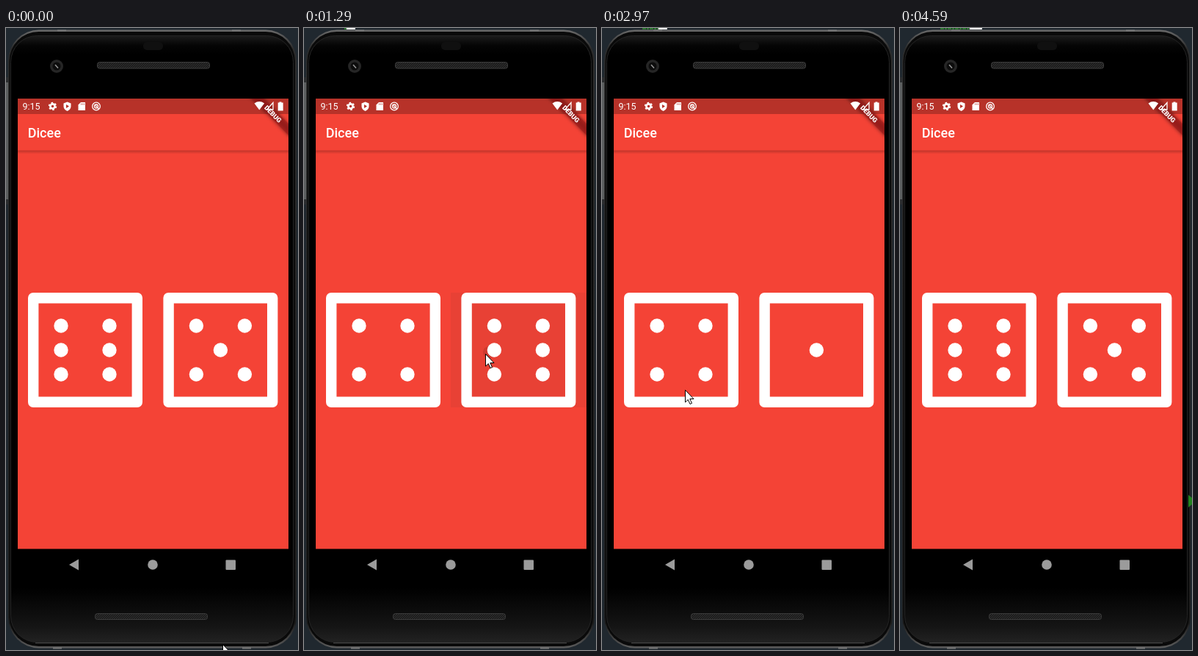
An HTML page that plays this animation: 398 by 846 pixels, repeating every 4.67 s.

```html
<!DOCTYPE html>
<html lang="en">
<head>
<meta charset="utf-8">
<title>Dicee</title>
<style>
  html, body { margin: 0; width: 100%; height: 100%; overflow: hidden; background: #20282f; }
  svg { display: block; width: 398px; height: 846px; }
  text { font-family: Roboto, sans-serif; fill: #fff; }
</style>
</head>
<body>
<svg viewBox="0 0 398 846">
  <defs>
    <linearGradient id="body" x1="0" y1="0" x2="0" y2="1">
      <stop offset="0" stop-color="#1c1c1c"/>
      <stop offset=".016" stop-color="#050505"/>
      <stop offset=".03" stop-color="#000"/>
      <stop offset=".91" stop-color="#000"/>
      <stop offset=".975" stop-color="#151515"/>
      <stop offset="1" stop-color="#222"/>
    </linearGradient>
    <linearGradient id="rim" x1="0" y1="0" x2="0" y2="1">
      <stop offset="0" stop-color="#6a6a6a"/>
      <stop offset=".03" stop-color="#2c2c2c"/>
      <stop offset=".96" stop-color="#1c1c1c"/>
      <stop offset="1" stop-color="#5c5c5c"/>
    </linearGradient>
    <linearGradient id="gleam">
      <stop offset="0" stop-color="#333"/>
      <stop offset=".75" stop-color="#aaa"/>
      <stop offset="1" stop-color="#555"/>
    </linearGradient>
    <linearGradient id="shade" x1="0" y1="0" x2="0" y2="1">
      <stop offset="0" stop-color="#000" stop-opacity=".22"/>
      <stop offset="1" stop-color="#000" stop-opacity="0"/>
    </linearGradient>
    <pattern id="mesh" width="3" height="3" patternUnits="userSpaceOnUse">
      <rect width="3" height="3" fill="#1b1b1b"/>
      <path d="M0 3L3 0" stroke="#383838" stroke-width=".8"/>
    </pattern>
    <filter id="soft" x="-20%" y="-100%" width="140%" height="300%"><feGaussianBlur stdDeviation="2.7"/></filter>
    <clipPath id="view"><rect x="16" y="96" width="369" height="612.6"/></clipPath>
  </defs>

  <!-- phone -->
  <rect width="398" height="846" fill="#20282f"/>
  <rect y="67" width="5" height="173" fill="#5c5f60"/>
  <path d="M0 70.5h5M0 236.5h5" stroke="#2b2d2f" stroke-width="7"/>
  <rect x="3" y="2.5" width="393" height="841" rx="42" fill="url(#rim)"/>
  <rect x="4.500" y="5" width="389.500" height="836" rx="40" fill="#0a0a0a"/>
  <rect x="6.5" y="10.5" width="385" height="825" rx="36" fill="url(#body)" stroke="#242424"/>
  <path d="M40 10.500H358" stroke="url(#gleam)"/>
  <path d="M40 836.500H358" stroke="#484848"/>
  <path d="M64 843.5h12M322 843.5h12M70 3.5h12M308 3.5h12" stroke="#777" stroke-width="2"/>
  <rect x="187" y="19" width="27" height="11" rx="5" fill="#101010"/>
  <circle cx="69" cy="52" r="9" fill="#262626"/>
  <circle cx="69" cy="52" r="5.5" fill="#0c0c0c"/>
  <path d="M67 50l4 4.500" stroke="#999" stroke-width="1.500"/>
  <g fill="url(#mesh)" stroke="#3c3c3c">
    <rect x="124.5" y="46.5" width="153" height="8.500" rx="3"/>
    <rect x="121.5" y="796.5" width="153" height="8" rx="3"/>
  </g>
  <g fill="#9b9b9b">
    <path d="M86 730l13-7.5v15z"/>
    <circle cx="200" cy="730" r="6.800"/>
    <rect x="299.5" y="723.5" width="13.5" height="13.5" rx="1"/>
  </g>

  <!-- app -->
  <g clip-path="url(#view)">
    <rect x="16" y="96" width="369" height="613" fill="#f44336"/>
    <rect x="16" y="166.500" width="369" height="5" fill="url(#shade)"/>
    <rect x="16" y="96" width="369" height="21" fill="#b73229"/>
    <text x="29.700" y="149" font-size="18" font-weight="500">Dicee</text>
    <g transform="translate(364 117) rotate(45)">
      <rect x="-60" y="-5.400" width="120" height="10.800" fill="#000" opacity=".5" filter="url(#soft)"/>
      <rect x="-60" y="-5.4" width="120" height="10.8" fill="#a51a1a" opacity=".63"/>
      <text y="3.2" font-size="9" font-weight="900" text-anchor="middle">DEBUG</text>
    </g>
    <text x="22.5" y="111" font-size="12.5">9:15</text>
    <g fill="#fff">
      <circle cx="63.5" cy="106.5" r="3.1" fill="none" stroke="#fff" stroke-width="2.6"/>
      <circle cx="63.5" cy="106.5" r="4.8" fill="none" stroke="#fff" stroke-width="1.8" stroke-dasharray="2.5 2.526"/>
      <path d="M83.500 100.500l5 2v4q0 4-5 6.500q-5-2.500-5-6.500v-4z"/>
      <path d="M82 104v5l4-2.500z" fill="#b73229"/>
      <path d="M102 101h6v11h-9.500v-7.500z"/>
      <path d="M102.500 102.500v2M104.500 102.500v2M106.500 102.500v2" stroke="#b73229" stroke-width=".8"/>
      <g fill="none" stroke="#fff" stroke-width="1.3">
        <circle cx="123" cy="106.500" r="5.300"/>
        <circle cx="123" cy="106.500" r="2.500"/>
        <path d="M122 105.500l4.500 4.500"/>
      </g>
      <path d="M338.500 102.500q6.800-4.800 13.600 0l-6.800 9z"/>
      <path d="M364 101.500v9.500h-8.500z" fill="none" stroke="#fff" stroke-width="1.300"/>
      <path d="M372.500 100.500h3v1h2.200v11h-7v-11h1.800z"/>
    </g>
    <g id="ink">
      <rect y="360" width="185" height="156" fill="#e84135"/>
      <circle id="spot" r="8" fill="#cf392f"/>
    </g>
    <g id="dice"></g>
  </g>

  <!-- windows behind the phone -->
  <g id="strip">
    <path id="done" stroke="#2f7a33" stroke-width="2" stroke-dasharray="5 1 3 1"/>
    <path id="head" stroke="#fff" stroke-width="2"/>
  </g>
  <path id="run" d="M393 635l5 4v9l-5 4z" fill="#23831f"/>

  <circle id="tap" r="12" fill="#f9a01e"/>
  <path id="mouse" d="M.5 .5V17L4.300 13.500L7 19.500L9.500 18.400L6.800 12.500H12Z" fill="#fff" stroke="#000" stroke-linejoin="round"/>
</svg>
<script>
  const LOOP = 4670, TICK = 76.6, LEAD = 26;
  const $ = id => document.getElementById(id);
  const show = (el, on) => el.setAttribute('visibility', on ? 'visible' : 'hidden');
  const move = (el, [x, y]) => el.setAttribute('transform', `translate(${Math.round(x)} ${Math.round(y)})`);

  // pointer route: tick, x, y
  const route = [
    [0, 295, 838], [4, 196, 630], [7, 82, 455], [8, 66, 454], [10, 72, 456],
    [13, 225, 466], [15, 318, 453], [16, 252, 441], [17, 247, 443], [20, 225, 452],
    [23, 135, 462], [24, 123, 457], [26, 150, 485], [29, 323, 485], [31, 364, 470],
    [33, 312, 467], [36, 210, 566], [40, 110, 470], [44, 317, 470], [46, 295, 487],
    [48, 172, 545], [50, 95, 480], [54, 300, 475], [57, 385, 870]
  ];
  // presses: tick, die, face rolled
  const taps = [[8, 0, 4], [16, 1, 6], [24, 0, 4], [31, 1, 1], [40, 0, 6], [44, 1, 2], [50, 0, 6], [54, 1, 5]];

  // pips by column and row, with the faces that show each
  const pips = [
    [-1, -1, '456'], [1, -1, '23456'], [-1, 0, '6'], [0, 0, '135'],
    [1, 0, '6'], [-1, 1, '23456'], [1, 1, '456']
  ];

  function makeDie(x) {
    const dots = pips.map(([c, r]) => `<circle cx="${c * 33}" cy="${r * 33}" r="9.700"/>`).join('');
    $('dice').insertAdjacentHTML('beforeend',
      `<g transform="translate(${x} 438)" fill="#fff"><path fill-rule="evenodd"
      d="M-71-78H71a7 7 0 0 1 7 7V71a7 7 0 0 1-7 7H-71a7 7 0 0 1-7-7V-71a7 7 0 0 1 7-7zM-63.600-63.600V63.600H63.600V-63.600z"/>${dots}</g>`);
    const circles = [...$('dice').lastElementChild.querySelectorAll('circle')];
    return face => circles.forEach((el, i) => show(el, pips[i][2].includes(face)));
  }
  const dice = [makeDie(108), makeDie(292.4)];

  // cubic path through the route
  function pointer(n) {
    const last = route.length - 1;
    if (n >= route[last][0]) return route[last].slice(1);
    const k = route.findIndex(p => p[0] > n) - 1;
    const at = i => route[Math.max(0, Math.min(last, i))];
    const a = at(k - 1), b = at(k), c = at(k + 1), d = at(k + 2);
    const span = c[0] - b[0], u = (n - b[0]) / span;
    return [1, 2].map(j => {
      const m0 = (c[j] - a[j]) / (c[0] - a[0]) * span;
      const m1 = (d[j] - b[j]) / (d[0] - b[0]) * span;
      const e = u * u * (3 - 2 * u);
      return b[j] + (c[j] - b[j]) * e + m0 * u * (1 - u) ** 2 - m1 * u * u * (1 - u);
    });
  }

  function draw(n) {
    const pos = pointer(n);
    move($('mouse'), pos);
    move($('tap'), pos);
    show($('mouse'), n < 57);
    show($('tap'), taps.some(p => p[0] === n));

    const faces = [6, 5];
    for (const [t, die, face] of taps) if (t < n) faces[die] = face;
    faces.forEach((face, i) => dice[i](face));

    const press = taps.find(p => p[0] === n - 1);
    show($('ink'), press);
    if (press) {
      const left = press[1] ? 200 : 16, [x, y] = pointer(press[0]);
      move($('ink'), [left, 0]);
      move($('spot'), [x - left, y]);
    }

    const x = 57 + Math.max(0, n - 16) * .86;
    show($('strip'), n >= 9);
    $('done').setAttribute('d', `M55 1H${x}`);
    $('head').setAttribute('d', `M${x} 1h${n < 58 ? 12 : 17}`);
    show($('run'), n >= 56);
  }

  const start = performance.now();
  let shown = -1;
  function loop() {
    const t = (performance.now() - start) % LOOP;
    const n = Math.min(60, Math.floor((t + LEAD) / TICK));
    if (n !== shown) draw(shown = n);
    requestAnimationFrame(loop);
  }
  loop();
</script>
</body>
</html>
```
